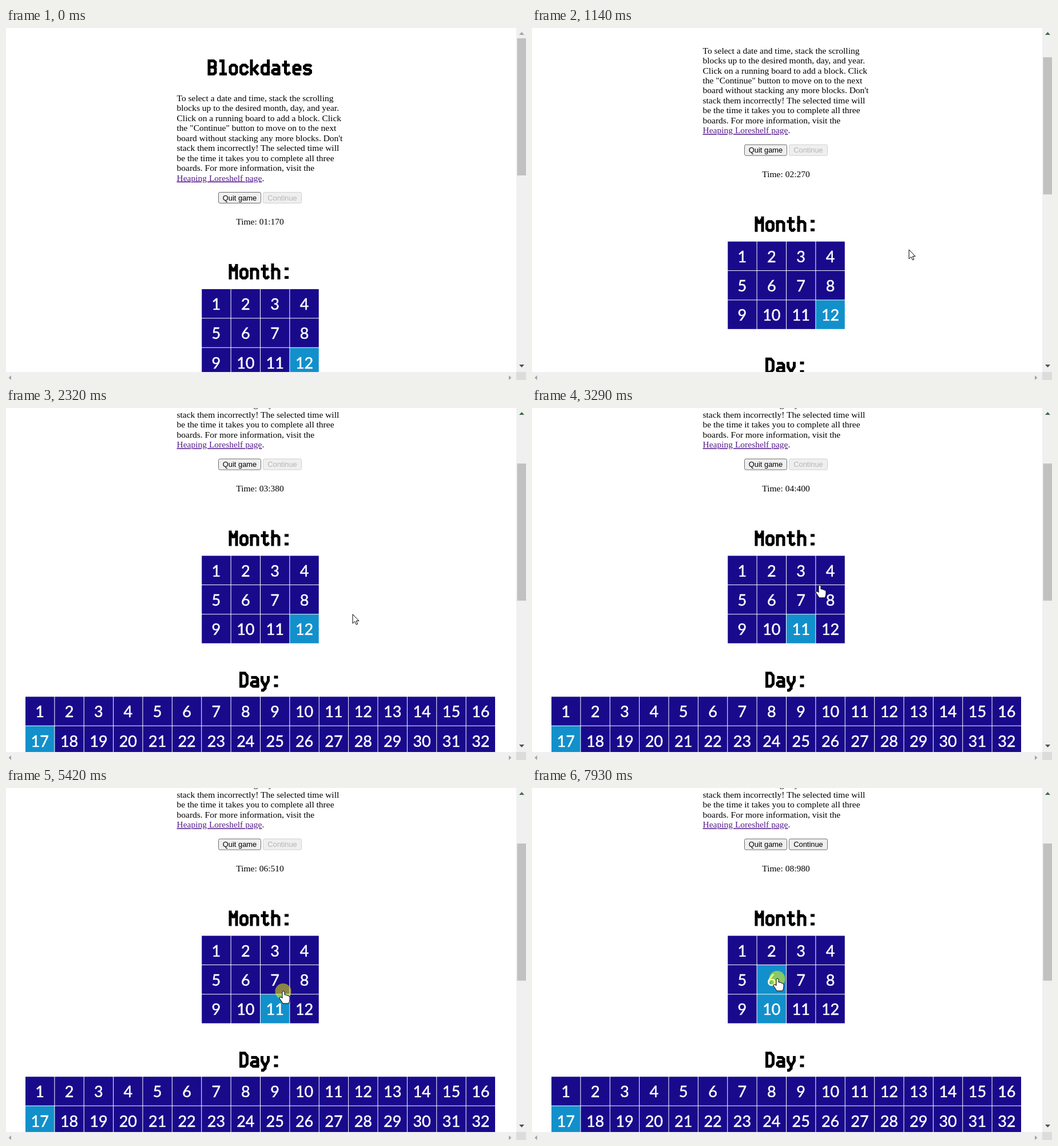
Animation of 909x616 px, one loop 8 s. Source, as an HTML page:

```html
<!DOCTYPE html>
<html lang="en">
<head>
<meta charset="utf-8">
<title>Blockdates</title>
<style>
  html, body { margin: 0; width: 100%; height: 100%; overflow: hidden; background: #fff; }
  svg { display: block; width: 909px; height: 616px; }
  .prose { font: 15.5px "Liberation Serif", serif; }
  .link { fill: #551a8b; text-decoration: underline; }
  .button { font: 12.9px "Liberation Sans", sans-serif; text-anchor: middle; }
  .button rect { fill: #efefef; stroke: #6f6f6f; }
  .disabled text { fill: #b5b5b5; }
  .disabled rect { stroke: #d0d0d0; }
  .heading { fill: none; stroke: #000; stroke-width: 5; stroke-linecap: square; stroke-miterlimit: 1.5; }
  .cell rect { fill: #190a8c; }
  .cell.lit rect { fill: #1290cb; }
  .cell text { font: 27px Lato, sans-serif; fill: #fff; stroke: #fff; stroke-width: .5; text-anchor: middle; }
  .cursor { fill: #fff; stroke: #000; }
</style>
</head>
<body>
<svg id="stage" viewBox="0 0 909 616">
  <g id="page"></g>
  <g id="scrollbars">
    <path fill="#f0f0f0" d="M0 602H892V616H0ZM892 0H909V602H892Z"/>
    <path fill="#dcdcdc" d="M892 602H909V616H892Z"/>
    <path fill="#a3a3a3" d="M9 608V616L4.5 612ZM879 608V616L883.5 612Z"/>
    <path fill="#505050" d="M897 589H906L901.5 594Z"/>
    <path id="upArrow" d="M897 12H906L901.5 7Z"/>
    <rect id="thumb" x="893.5" width="15.5" height="240" fill="#c1c1c1"/>
  </g>
  <circle id="click" r="14" fill="#ff0" fill-opacity=".5"/>
  <g id="pointer" class="cursor">
    <path id="arrow" d="M0 0V16L3.8 12.5L6.3 18L8.7 17L6.3 11.5H11Z"/>
    <path id="hand" d="M-2 1.5Q0-1 2 1.5V7H4Q5 6.5 6 8Q8 7.5 8.5 9Q11 8.5 11 11V15Q11 18 9 22H-1Q-4 17-7 13Q-7 10-4 11L-2 13Z"/>
  </g>
</svg>
<script>
const $ = id => document.getElementById(id);
const page = $('page');
const CENTER = 444.5;

function add(parent, tag, attrs = {}, text = '') {
  const el = document.createElementNS('http://www.w3.org/2000/svg', tag);
  for (const name in attrs) el.setAttribute(name, attrs[name]);
  el.textContent = text;
  parent.append(el);
  return el;
}

// Blocky monospace letters as strokes; the baseline is y = 0.
const ADVANCE = 18.5;
const GLYPHS = {
  B: 'M3-25.5H11L14-23V-17L11-14.5H3M11-14.5L14-12V-5L11-2.5H3V-25.5',
  D: 'M3-25.5H10L14-21V-7L10-2.5H3Z',
  M: 'M3-2.5V-24.5M14-2.5V-24.5M4-22L8.5-15L13-22',
  a: 'M5-18H11L14-15V-2.5M14-10.5H6L3-8V-5L6-2.5H11L14-4.5',
  c: 'M14-15L11-18H6L3-15V-5.5L6-2.5H11L14-5.5',
  d: 'M14-25.5V-2.5M14-15L11-18H6L3-15V-5.5L6-2.5H11L14-5.5',
  e: 'M3-10.5H14V-15L11-18H6L3-15V-5.5L6-2.5H12',
  h: 'M3-25.5V-2.5M3-15L6-18H11L14-15V-2.5',
  k: 'M3-25.5V-2.5M3-10.5H7L13-17M7-10.5L13.5-3',
  l: 'M5-25.5H9V-2.5M5-2.5H13',
  n: 'M3-18V-2.5M3-15L6-18H11L14-15V-2.5',
  o: 'M6-18H11L14-15V-5.5L11-2.5H6L3-5.5V-15Z',
  s: 'M13.5-17L12-18H6L3-15.5V-13L6-10.5H11L14-8V-5L11-2.5H5L3.5-3.5',
  t: 'M7-23.5V-5.5L9.5-2.5H12L13.5-4M3.5-18H12',
  y: 'M3-18V-12L8.5-3M14-18V-12L8.5-3V1L5 4.5H4',
  ':': 'M8-18.5H10M8-3.5H10'
};

function heading(text, baseline) {
  const group = add(page, 'g', { class: 'heading', role: 'img', 'aria-label': text });
  const left = CENTER - text.length * ADVANCE / 2;
  [...text].forEach((char, i) => add(group, 'path', {
    d: GLYPHS[char], transform: `translate(${left + i * ADVANCE} ${baseline})`
  }));
}

function button(label, x, width) {
  const group = add(page, 'g', { class: 'button' });
  add(group, 'rect', { x: x + .5, y: 287.5, width: width - 1, height: 19, rx: 2.5 });
  add(group, 'text', { x: x + width / 2, y: 301.5 }, label);
  return group;
}

function board(top, columns, count) {
  const pitch = 51.375, size = pitch - 1;
  const left = CENTER - (columns * pitch - 1) / 2;
  return Array.from({ length: count }, (_, i) => {
    const x = left + i % columns * pitch, y = top + Math.floor(i / columns) * pitch;
    const group = add(page, 'g', { class: 'cell' });
    add(group, 'rect', { x, y, width: size, height: size });
    add(group, 'text', { x: x + size / 2, y: y + 36 }, i + 1);
    return group;
  });
}

heading('Blockdates', 83);
[
  'To select a date and time, stack the scrolling',
  'blocks up to the desired month, day, and year.',
  'Click on a running board to add a block. Click',
  'the "Continue" button to move on to the next',
  "board without stacking any more blocks. Don't",
  'stack them incorrectly! The selected time will',
  'be the time it takes you to complete all three',
  'boards. For more information, visit the'
].forEach((line, i) => add(page, 'text', { class: 'prose', x: 298.5, y: 128 + i * 17.45 }, line));
const linkLine = add(page, 'text', { class: 'prose', x: 298.5, y: 267.6 });
add(linkLine, 'tspan', { class: 'link' }, 'Heaping Loreshelf page');
add(linkLine, 'tspan', {}, '.');

button('Quit game', 371, 75);
const continueButton = button('Continue', 449, 68);
const timer = add(page, 'text', { class: 'prose', x: 402.3, y: 344 });
heading('Month:', 440);
const months = board(457, 4, 12);
heading('Day:', 688);
board(703.7, 16, 32)[16].classList.add('lit');

// Keyframes: time in ms, then values.
const LOOP = 8000, LOCKED = 5640;
const CLOCK = [[0, 1170], [1140, 2270], [1450, 2550], [3290, 4400],
  [5420, 6510], [6530, 7600], [7930, 8980], [8000, 9050]];
const SCROLL = [[600, 0], [830, 40], [1140, 83.3], [1450, 189], [1600, 198.4]];
const POINTER = [[200, 700, 620], [750, 659, 388], [1700, 659, 388], [2480, 588, 352],
  [3290, 503, 310], [4700, 485, 355], [5850, 485, 355], [6450, 406, 330],
  [6900, 406, 330], [7600, 429, 333]];
const CLICKS = [[5380, LOCKED], [7820, LOOP]];

function sample(keys, t) {
  if (t <= keys[0][0]) return keys[0].slice(1);
  const next = keys.findIndex(key => key[0] > t);
  if (next < 0) return keys[keys.length - 1].slice(1);
  const a = keys[next - 1], b = keys[next], f = (t - a[0]) / (b[0] - a[0]);
  return a.slice(1).map((value, i) => value + (b[i + 1] - value) * f);
}

function hold(t) {
  const next = CLOCK.findIndex(key => key[0] > t);
  const start = CLOCK[next - 1][0], span = CLOCK[next][0] - start;
  const steps = Math.round(span / 60);
  return start + Math.floor((t - start) / span * steps) * span / steps;
}

function litMonths(t) {
  const n = Math.max(0, Math.floor((Math.min(t, LOCKED) - 2650) / 360));
  const lit = [8 + Math.abs(3 - n % 6)];
  if (t >= LOCKED) lit.push(7 - Math.abs(3 - Math.floor((t - LOCKED) / 208) % 6));
  return lit;
}

const show = (el, visible) => el.setAttribute('display', visible ? 'inline' : 'none');
const move = (el, x, y) => el.setAttribute('transform', `translate(${x} ${y})`);

function draw(t) {
  const [scroll] = sample(SCROLL, t);
  move(page, 0, -scroll);
  $('thumb').setAttribute('y', 18 + scroll * .399);
  $('upArrow').setAttribute('fill', scroll ? '#3d6b45' : '#a3a3a3');

  const ms = Math.floor(sample(CLOCK, t)[0] / 10 + .001) * 10;
  const pad = (value, size) => String(value).padStart(size, '0');
  timer.textContent = `Time: ${pad(Math.floor(ms / 1000), 2)}:${pad(ms % 1000, 3)}`;

  const lit = litMonths(t);
  months.forEach((cell, i) => cell.classList.toggle('lit', lit.includes(i)));
  continueButton.classList.toggle('disabled', t < LOCKED);

  const [x, y] = sample(POINTER, t).map(Math.round);
  const overBoard = x < 547;
  move($('pointer'), x, y);
  move($('click'), x - .5, y + 1);
  show($('pointer'), t > POINTER[0][0]);
  show($('arrow'), !overBoard);
  show($('hand'), overBoard);
  show($('click'), CLICKS.some(([from, to]) => t >= from && t < to));
}

let began;
function tick(now) {
  began ??= now;
  draw(hold((now - began) % LOOP));
  requestAnimationFrame(tick);
}
draw(0);
requestAnimationFrame(tick);
</script>
</body>
</html>
```
